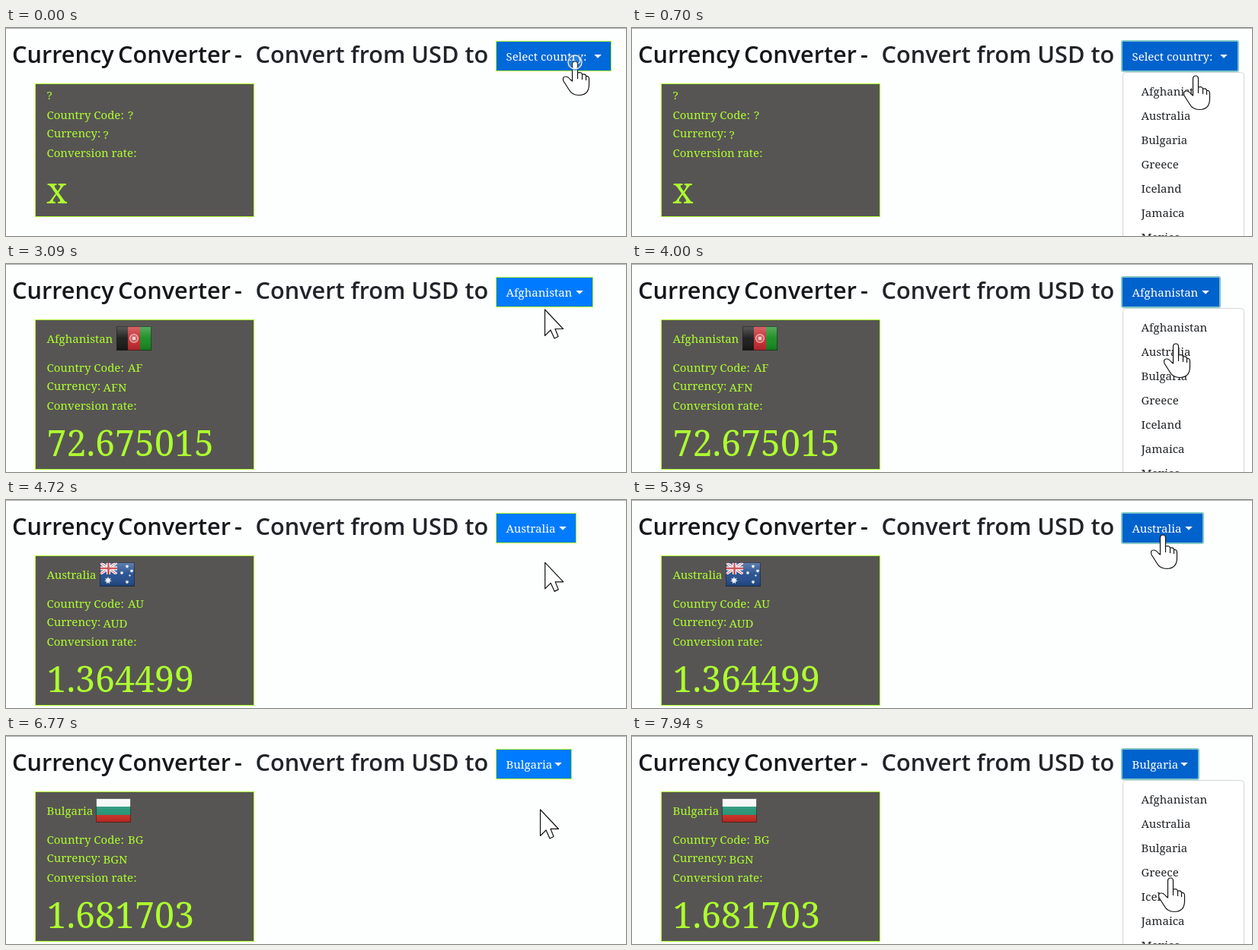
An HTML page for the animation above (8000 ms loop, 814x274 px).

```html
<!DOCTYPE html>
<html lang="en">
<head>
<meta charset="utf-8">
<title>Currency Converter</title>
<style>
html, body { margin: 0; width: 100%; height: 100%; overflow: hidden; background: #fdfefe; }
svg { display: block; }
text { font: 500 15px "Noto Serif", serif; }
.head { font: 600 30.7px "Open Sans", "Noto Sans", sans-serif; }
.big { font-size: 46.5px; font-weight: 400; }
.card { fill: #adff2f; }
</style>
</head>
<body>
<svg width="814" height="274" viewBox="0 0 814 274">
  <defs>
    <linearGradient id="gloss" x2="0" y2="1">
      <stop offset="0" stop-color="#fff" stop-opacity=".3"/>
      <stop offset=".5" stop-color="#fff" stop-opacity=".06"/>
      <stop offset="1" stop-color="#000" stop-opacity=".15"/>
    </linearGradient>
  </defs>
  <rect width="814" height="1" fill="#aaa"/>
  <g fill="#15171a">
    <text class="head" x="8" y="46">Currency</text>
    <text class="head" x="147" y="46">Converter</text>
    <text class="head" x="300" y="46">-</text>
  </g>
  <text class="head" x="327.5" y="46" fill="#212529">Convert from USD to</text>
  <g id="scene"></g>
</svg>
<script>
const LOOP = 8000;
const scene = document.getElementById('scene');
const items = ['Afghanistan', 'Australia', 'Bulgaria', 'Greece', 'Iceland', 'Jamaica', 'Mexico'];

// Button label, its right edge, card details
const blank = { label: 'Select country:', right: 795, name: '?', code: '?', money: '?', rate: 'x' };
const countries = [
  { label: 'Afghanistan', right: 771, name: 'Afghanistan', code: 'AF', money: 'AFN', rate: '72.675015', flagX: 145 },
  { label: 'Australia', right: 749, name: 'Australia', code: 'AU', money: 'AUD', rate: '1.364499', flagX: 123 },
  { label: 'Bulgaria', right: 743, name: 'Bulgaria', code: 'BG', money: 'BGN', rate: '1.681703', flagX: 118 }
];

// Bursts of screen updates: start, end, number of steps
const bursts = [[120, 850, 6], [1690, 2120, 4], [3090, 4000, 8], [4140, 5110, 8],
  [5240, 6220, 8], [6370, 7400, 9], [7550, 7940, 4]];

// Pointer path: time, x, y
const path = [[0, 747, 45], [266, 747, 45], [850, 733, 83], [2120, 733, 83], [3090, 707, 60],
  [3220, 702, 47], [3480, 702, 47], [4000, 714, 106], [4417, 714, 106], [5110, 697, 47],
  [5520, 697, 47], [6220, 702, 147], [6499, 702, 147], [6756, 701, 97], [7142, 700, 46],
  [7550, 700, 46], [7940, 707, 188]];

// Focus start, menu opening, menu closing
const menus = [[120, 260, 1830], [3480, 3480, 4275], [5375, 5515, 6495], [7265, 7265, LOOP]];
const presses = [[0, 120], [1690, 1830], [3350, 3475], [4140, 4275], [5240, 5375], [6370, 6495], [7140, 7265]];
const labelTimes = [1830, 4275, 6495];
const cardTimes = [1970, 4410, 6620];

const within = (t, a, b) => t >= a && t < b;
const text = (x, y, s, fill, cls = '') =>
  `<text x="${x}" y="${y}" class="${cls}"${fill ? ` fill="${fill}"` : ''}>${s}</text>`;
const rect = (x, y, w, h, fill, more = '') =>
  `<rect x="${x}" y="${y}" width="${w}" height="${h}" fill="${fill}" ${more}/>`;

function snap(t) {
  let last = 0;
  for (const [a, b, n] of bursts) {
    if (t < a) break;
    const step = (b - a) / (n - 1);
    last = a + step * Math.min(n - 1, Math.floor((t - a) / step + 0.001));
  }
  return last;
}

function pointer(t) {
  const i = path.findIndex(p => p[0] > t);
  if (i < 0) return path[path.length - 1].slice(1);
  const [a, x, y] = path[i - 1], [b, u, v] = path[i];
  const k = (t - a) / (b - a);
  return [x + (u - x) * k, y + (v - y) * k];
}

const chosen = (times, t) => countries[times.filter(s => t >= s).length - 1] || blank;

function star(x, y, r) {
  let d = '';
  for (let i = 0; i < 14; i++) {
    const a = i * Math.PI / 7, q = i % 2 ? r / 2 : r;
    d += `${x + q * Math.sin(a)},${y - q * Math.cos(a)} `;
  }
  return `<polygon points="${d}" fill="#fff"/>`;
}

const flags = {
  AF: () => rect(0, 0, 16, 32, '#151515') + rect(15, 0, 16, 32, '#c4262b') + rect(31, 0, 15, 32, '#128a1c') +
    '<circle cx="23" cy="16" r="5.5" fill="#d05a5a" stroke="#eab8b8" stroke-width="1.2"/>' +
    rect(21, 14, 4, 4, '#f0cccc'),
  AU: () => rect(0, 0, 46, 32, '#204a8c') +
    '<svg width="23" height="16"><path d="M0 0L23 16M23 0L0 16" stroke="#fff" stroke-width="3.5"/>' +
    '<path d="M0 0L23 16M23 0L0 16" stroke="#c8313a"/>' +
    '<path d="M11.5 0V16M0 8H23" stroke="#fff" stroke-width="5"/>' +
    '<path d="M11.5 0V16M0 8H23" stroke="#c8313a" stroke-width="2.6"/></svg>' +
    star(11, 24, 5) + star(36, 5.5, 2.6) + star(29, 14, 2.6) + star(42, 11.5, 2.6) +
    star(36, 26, 2.8) + star(39.5, 17.5, 1.6),
  BG: () => rect(0, 0, 46, 11, '#f6f6f6') + rect(0, 11, 46, 11, '#1f9272') + rect(0, 22, 46, 10, '#cf2a20')
};

function card(c) {
  const known = c !== blank, dy = known ? 22 : 0;
  let s = rect(38.5, 73.5, 287, 175 + dy, '#575553', 'stroke="#adff2f"') +
    '<g class="card">' +
    text(53.5, known ? 104 : 94, c.name) +
    text(53.5, 120 + dy, 'Country Code:') + text(160, 120 + dy, c.code) +
    text(53.5, 144 + dy, 'Currency:') + text(127.5, 146 + dy, c.money) +
    text(53.5, 170 + dy, 'Conversion rate:') +
    text(53.5, 231 + dy, c.rate, '', 'big') + '</g>';
  if (known) s += `<svg x="${c.flagX}" y="82" width="46" height="32">${flags[c.code]()}` +
    rect(0, 0, 46, 32, 'url(#gloss)') +
    rect(0.5, 0.5, 45, 31, 'none', 'stroke="#222" stroke-opacity=".65"') + '</svg>';
  return s;
}

function button(c, focus, hover) {
  const w = c.right - 644, m = c.right - 18;
  const edge = focus
    ? rect(643, 17, w + 2, 40, 'none', 'rx="2" stroke="#80c6c8" stroke-width="2"')
    : rect(643.5, 17.5, w, 39, 'none', 'stroke="#adff2f"');
  return rect(644, 18, w, 39, focus ? '#0062cc' : hover ? '#0069d9' : '#007bff') + edge +
    text(656.5, 43, c.label, '#fff') +
    `<path d="M${m - 4.8} 35h9.6l-4.8 4.8z" fill="#fff"/>`;
}

function menu(row, pressed) {
  let s = rect(644.5, 58.5, 159, 240, '#fff', 'rx="4" stroke="#d4d6d8"');
  items.forEach((name, i) => {
    const hot = pressed && i === row;
    if (hot) s += rect(645, 67 + i * 32, 158, 32, '#007bff');
    s += text(668.5, 89 + i * 32, name, hot ? '#fff' : '#212529');
  });
  return s;
}

function cursor(x, y, hand, pressed) {
  const ring = pressed
    ? '<circle r="9.5" fill="#fff" fill-opacity=".15" stroke="#2a6fb5" stroke-width="2.4"/>' +
      '<circle r="9" fill="none" stroke="#e6f2ff" stroke-width="1.3"/>' : '';
  const shape = hand
    ? 'M-3.5 3Q-3.5-1 0-1T3.5 3V14Q8.5 12.5 9.5 16Q14 15 14.5 18.5Q18.5 18 18.5 22V30Q18 43.5 5 43.5' +
      'Q-4 43.5-8 36L-15 25Q-17 19-12 19Q-9 19-6 23L-3.5 25ZM3.5 14V22M9.5 16V23M14.5 18.5V24'
    : 'M0.5 0V34.5L8 27L13 38L18 35.5L14 25.5H24.5Z';
  return `<g transform="translate(${x} ${y})"><path d="${shape}" fill="#fff" stroke="#111" stroke-width="1.2" ` +
    `stroke-linejoin="round"/>${ring}</g>`;
}

function draw(t) {
  const [x, y] = pointer(t);
  const focus = menus.some(m => within(t, m[0], m[2]));
  const open = menus.some(m => within(t, m[1], m[2]));
  const pressed = presses.some(p => within(t, ...p));
  const onButton = y < 57;
  scene.innerHTML = card(chosen(cardTimes, t)) +
    button(chosen(labelTimes, t), focus, onButton) +
    (open ? menu(Math.floor((y - 67) / 32), pressed) : '') +
    cursor(x, y, open || onButton, pressed);
}

let shown = -1;
function tick() {
  const t = snap(performance.now() % LOOP);
  if (t !== shown) draw(shown = t);
  requestAnimationFrame(tick);
}
tick();
</script>
</body>
</html>
```
